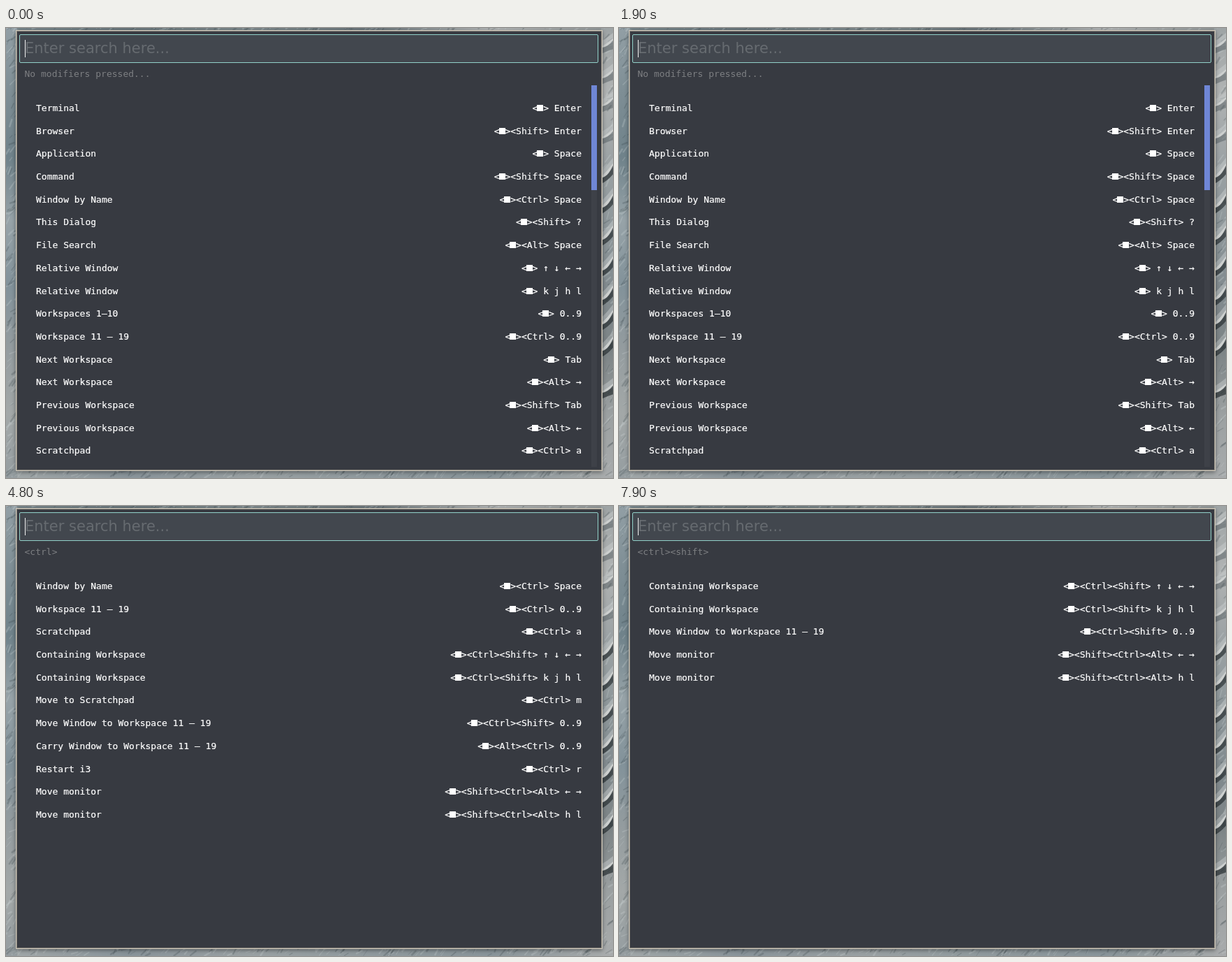
An HTML page with a canvas that plays this animation: 869 px wide and 644 px high, repeating every 8000 ms.

```html
<!DOCTYPE html>
<html lang="en">
<head>
<meta charset="utf-8">
<style>
html, body { margin: 0; width: 100%; height: 100%; overflow: hidden; background: #808b8f; }
body * { position: absolute; box-sizing: border-box; }
canvas { left: 0; top: 0; }
#panel { left: 14px; top: 3px; width: 840px; height: 631px; background: #373a41;
  border: 1px solid #d0c9bb; box-shadow: inset 0 0 0 1px #85827b, 0 2px 6px #0006; }
#entry { left: 19px; top: 9px; width: 829px; height: 41px; background: #42474e;
  border: 1px solid #92d1c9; border-radius: 2px; }
#text { left: 27px; top: 14px; font: 21px/31px "DejaVu Sans", sans-serif; color: #fff; white-space: pre; }
#text.hint { color: #666b70; }
#caret { top: 17px; width: 1px; height: 25px; background: #f2f2f2; }
#mods, .row { font: 13px "DejaVu Sans Mono", monospace; white-space: pre; }
#mods { left: 26.5px; top: 56.3px; line-height: 20px; color: #7d7f82; }
.row { left: 43px; width: 781px; height: 32.7px; line-height: 32.7px; color: #fff; -webkit-text-stroke: .2px #fff; }
.row span { right: 0; }
.row b { position: relative; display: inline-block; width: 1ch; }
.row b::before { content: ""; position: absolute; left: -1px; top: -9px; width: 9px; height: 9px; background: #fff; }
#track { left: 838px; top: 82px; width: 8px; height: 546px; background: #3e4148; }
#thumb { width: 8px; background: #6f86d6; }
</style>
</head>
<body>
<canvas id="ground" width="869" height="644"></canvas>
<div id="panel"></div>
<div id="entry"></div>
<div id="text"></div>
<div id="caret"></div>
<div id="mods"></div>
<div id="list"></div>
<div id="track"><div id="thumb"></div></div>
<script>
const $ = id => document.getElementById(id);

// One shortcut per line; * stands for the super key.
const shortcuts = `Terminal=* Enter
Browser=*<Shift> Enter
Application=* Space
Command=*<Shift> Space
Window by Name=*<Ctrl> Space
This Dialog=*<Shift> ?
File Search=*<Alt> Space
Relative Window=* ↑ ↓ ← →
Relative Window=* k j h l
Workspaces 1–10=* 0..9
Workspace 11 – 19=*<Ctrl> 0..9
Next Workspace=* Tab
Next Workspace=*<Alt> →
Previous Workspace=*<Shift> Tab
Previous Workspace=*<Alt> ←
Scratchpad=*<Ctrl> a
Window Position=*<Shift> ↑ ↓ ← →
Window Position=*<Shift> k j h l
Containing Workspace=*<Ctrl><Shift> ↑ ↓ ← →
Containing Workspace=*<Ctrl><Shift> k j h l
Move to Scratchpad=*<Ctrl> m
Window Fullscreen Toggle=* f
Window Floating Toggle=*<Shift> f
Window Layout Mode=* t
Move Window to Workspace 1 – 10=*<Shift> 0..9
Move Window to Workspace 11 – 19=*<Ctrl><Shift> 0..9
Carry Window to Workspace 1 – 10=*<Alt> 0..9
Carry Window to Workspace 11 – 19=*<Alt><Ctrl> 0..9
Wifi Settings=* w
Window Gaps=+ –
Exit App=*<Shift> q
Reload i3=*<Shift> r
Restart i3=*<Ctrl> r
Logout=*<Shift> e
Reboot=*<Shift> b
Power Down=*<Shift> p
Move monitor=*<Shift><Ctrl><Alt> ← →
Move monitor=*<Shift><Ctrl><Alt> h l`.split("\n").map(line => {
  const [name, keys] = line.split("=");
  return { name, keys };
});

// start time, typed text, pressed modifiers, scroll thumb height
const steps = [
  [0, "", "", 150], [500, "p", "", 294], [700, "pw", "", 0], [1000, "pwr", "", 0],
  [1500, "pw", "", 0], [1800, "p", "", 294], [1900, "", "", 150], [2700, "w", "", 277],
  [3000, "wk", "", 0], [3300, "wks", "", 0], [4000, "wk", "", 0], [4200, "w", "", 277],
  [4400, "", "", 150], [4800, "", "<ctrl>", 0], [6400, "", "", 150],
  [6600, "", "<shift>", 490], [7900, "", "<ctrl><shift>", 0]
];

// Lowest is best: start of the name, then of a word, then anywhere; close letters first.
function score(name, query) {
  let best = Infinity;
  for (let i = 0; i < name.length; i++) {
    if (name[i] !== query[0]) continue;
    let at = i;
    for (const c of query.slice(1)) if (at >= 0) at = name.indexOf(c, at + 1);
    const rank = i === 0 ? 0 : name[i - 1] === " " ? 100 : 200;
    if (at >= 0) best = Math.min(best, rank + at - i);
  }
  return best;
}

function find(query, mods) {
  const held = mods.match(/<\w+>/g) || [];
  const hits = shortcuts.filter(s => held.every(m => s.keys.toLowerCase().includes(m)));
  if (!query) return hits;
  return hits.map(s => ({ ...s, score: score(s.name.toLowerCase(), query) }))
    .filter(s => s.score < Infinity).sort((a, b) => a.score - b.score);
}

const escape = s => s.replace(/</g, "&lt;").replace("*", "&lt;<b></b>&gt;");

function show([, query, mods, thumb]) {
  const text = $("text");
  text.textContent = query;
  text.className = query ? "" : "hint";
  $("caret").style.left = Math.round(27.4 + text.getBoundingClientRect().width) + "px";
  if (!query) text.textContent = "Enter search here...";
  $("mods").textContent = mods || "No modifiers pressed...";
  $("list").innerHTML = find(query, mods).slice(0, 16).map((s, i) =>
    `<div class="row" style="top:${98.9 + i * 32.7}px">${s.name}<span>${escape(s.keys)}</span></div>`).join("");
  $("track").style.display = thumb ? "" : "none";
  $("thumb").style.height = thumb + "px";
}

function paintGround() {
  const g = $("ground").getContext("2d");
  let seed = 7;
  const rnd = () => (seed = seed * 16807 % 2147483647) / 2147483647;
  const strip = (x, y, w, h, colors) => {
    const fill = w > h ? g.createLinearGradient(x, 0, x + w, 0) : g.createLinearGradient(0, y, 0, y + h);
    colors.forEach((c, i) => fill.addColorStop(i / (colors.length - 1), c));
    g.fillStyle = fill;
    g.fillRect(x, y, w, h);
  };
  strip(0, 0, 869, 5, ["#78868b", "#68757a", "#7c888b", "#687378", "#b2b5b5", "#8e9495"]);
  strip(0, 632, 869, 12, ["#a3a9aa", "#89949a", "#9aa1a3", "#909a9e", "#89959a", "#a9acac"]);
  strip(0, 0, 16, 644, ["#929fa5", "#7e8e95", "#6f828a", "#97a3a8", "#82929a", "#949c9f", "#a3a8a8", "#959da0"]);
  strip(852, 0, 17, 644, ["#9ea4a5", "#b0b3b3", "#9da3a5", "#8f989b", "#838c90", "#7c8385", "#9ba0a1", "#a8abac"]);

  // soft slanted relief along the edges
  g.lineCap = "round";
  for (let i = 0; i < 420; i++) {
    const along = rnd(), side = rnd();
    const [x, y] = side < .3 ? [rnd() * 15, along * 644] : side < .5 ? [853 + rnd() * 16, along * 644]
      : side < .7 ? [along * 869, rnd() * 4] : [along * 869, 634 + rnd() * 10];
    g.strokeStyle = rnd() < .5 ? "rgba(45,60,66,.22)" : "rgba(215,220,220,.24)";
    g.lineWidth = .7 + rnd() * 2;
    g.beginPath();
    g.moveTo(x, y);
    g.lineTo(x + 3 + rnd() * 6, y - 2 - rnd() * 9);
    g.stroke();
  }

  // dunes on the right
  for (const y of [28, 72, 112, 158, 214, 257, 303, 347, 389, 424, 462, 522]) {
    const rise = y > 190 && y < 500 ? 21 : 13;
    const band = (top, depth, color) => {
      g.beginPath();
      g.moveTo(852, y + top);
      g.quadraticCurveTo(862, y + top - rise * .45, 870, y + top - rise);
      g.lineTo(870, y + top - rise + depth);
      g.quadraticCurveTo(862, y + top + depth * .3, 852, y + top + depth * .6);
      g.fillStyle = color;
      g.fill();
    };
    band(-9, 15, "rgba(205,209,208,.45)");
    band(0, 15, y > 190 ? "rgba(40,47,50,.7)" : "rgba(65,74,79,.4)");
    band(-1, 2.5, "#cdd0cf");
  }
}

let current = null;
function frame(now) {
  const t = now % 8000;
  const step = steps.filter(s => s[0] <= t).pop();
  if (step !== current) show(current = step);
  requestAnimationFrame(frame);
}

paintGround();
show(current = steps[0]);
requestAnimationFrame(frame);
</script>
</body>
</html>
```
